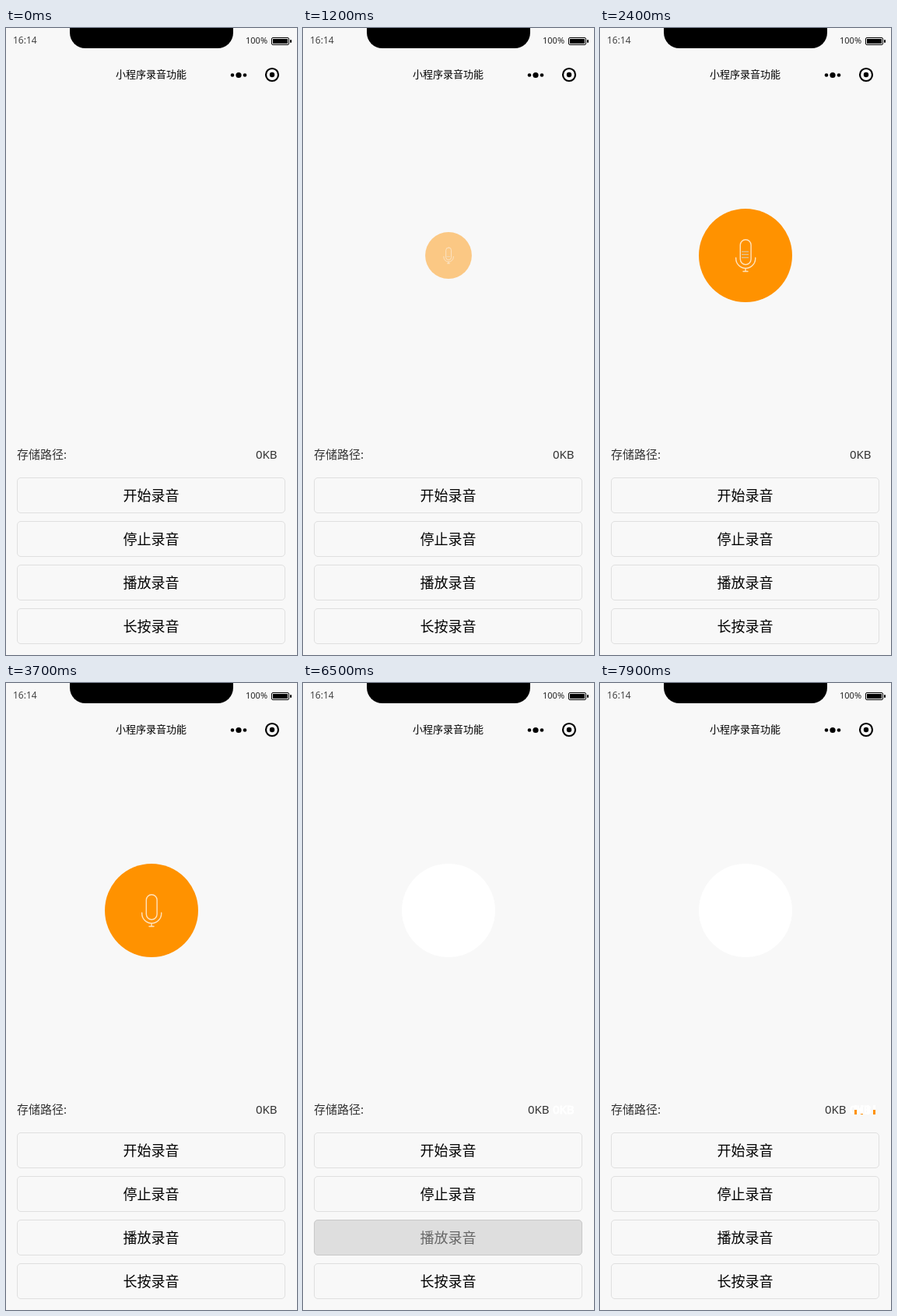
An HTML page that plays this animation: 374 by 805 pixels, repeating every 8 s.

```html
<!DOCTYPE html>
<html lang="zh-CN">
<head>
<meta charset="utf-8">
<style>
  html, body { margin: 0; height: 100%; overflow: hidden; background: #f8f8f8; }
  svg { display: block; width: 374px; height: 805px; font-family: "Noto Sans", "Noto Sans CJK SC", "Noto Sans CJK", sans-serif; }
  .line { fill: none; stroke: #ffe3bd; stroke-width: 1.4; stroke-linecap: round; }
  .key rect { fill: #f8f8f8; stroke: #dfdfdf; }
  .key text { font-size: 18px; text-anchor: middle; }
  .key.pressed rect { fill: #dedede; stroke: #c8c8c8; }
  .key.pressed text { fill: #666; }
</style>
</head>
<body>
<svg viewBox="0 0 374 805">
  <text x="9" y="20" font-size="12" fill="#444">16:14</text>
  <path d="M82 0V6a20 20 0 0 0 20 20H272a20 20 0 0 0 20-20V0Z"/>
  <text x="308" y="20" font-size="11" fill="#222">100%</text>
  <rect x="341.5" y="12.5" width="22" height="9" rx="1.5" fill="none" stroke="#000"/>
  <rect x="343" y="14" width="19" height="6"/>
  <rect x="365" y="15" width="2" height="4" rx="1"/>
  <text x="186.5" y="64" font-size="13" text-anchor="middle">小程序录音功能</text>
  <circle cx="291" cy="60.5" r="2.3"/><circle cx="299" cy="60.5" r="3.6"/><circle cx="307" cy="60.5" r="2.3"/>
  <circle cx="342" cy="60" r="8" fill="none" stroke="#000" stroke-width="2.2"/><circle cx="342" cy="60" r="3.2"/>

  <circle id="ghost" cx="187" cy="292" r="60" fill="#fff"/>
  <g id="recorder">
    <circle r="60" fill="#ff9200"/>
    <rect class="line" x="-6.7" y="-20.3" width="13.8" height="32" rx="6.9"/>
    <path class="line" d="M-12.3 3V4a12.5 12.5 0 0 0 25 0V3M0 16.5V20.5M-3 20.5H3"/>
    <g id="levels" fill="#e2c08e"></g>
  </g>

  <text x="14" y="553" font-size="15" fill="#333">存储路径:</text>
  <text id="ghostSize" x="321" y="553" font-size="15" fill="#fff" stroke="#fff">0KB</text>
  <text id="size" y="553" font-size="15" fill="#333">0KB</text>
  <g id="bars"></g>
  <g id="keys"></g>
</svg>
<script>
const $ = id => document.getElementById(id);

function add(parent, tag, attrs, text = '') {
  const el = document.createElementNS('http://www.w3.org/2000/svg', tag);
  for (const name in attrs) el.setAttribute(name, attrs[name]);
  el.textContent = text;
  return parent.appendChild(el);
}

const keys = ['开始录音', '停止录音', '播放录音', '长按录音'].map((label, i) => {
  const key = add($('keys'), 'g', { class: 'key' });
  const y = 577 + i * 56;
  add(key, 'rect', { x: 14.5, y: y + .5, width: 344, height: 45, rx: 4.5 });
  add(key, 'text', { x: 186.5, y: y + 30 }, label);
  return key;
});

const levels = [2, -2, -5.5, -8.5].map(y =>
  add($('levels'), 'rect', { x: -5, y, width: 9, height: 1.4 }));

const bars = [0, 1, 2, 3].map(i => {
  const bar = fill => add($('bars'), 'rect', { x: 327 + i * 8, width: 3, fill });
  return { trail: bar('#fff'), fill: bar('#ff9200') };
});

const show = (el, on) => el.setAttribute('visibility', on ? 'inherit' : 'hidden');

function setHeight(bar, h) {
  bar.setAttribute('y', 554 - h);
  bar.setAttribute('height', h);
}

function barHeight(i, t) {
  const degrees = (t - 7900) * .3 - 94 + i * 60;
  return Math.floor(12.95 * (1 - Math.cos(degrees * Math.PI / 180)) / 2);
}

function draw(t) {
  const recording = t >= 1100 && t < 4500;
  const playing = t >= 6500;
  keys[0].classList.toggle('pressed', t >= 1100 && t < 1200);
  keys[2].classList.toggle('pressed', t >= 6500 && t < 6600);

  // Zoom and fade in with an ease-out.
  const p = Math.min(1, Math.max(0, (t - 1100) / 400));
  const grow = 1 - (1 - p) ** 2.4;
  show($('recorder'), recording);
  $('recorder').setAttribute('transform', `translate(187 292) scale(${grow})`);
  $('recorder').setAttribute('opacity', grow * .86 + p * .14);
  show($('ghost'), t >= 4500);

  // Five-step level meter; its last step is empty.
  const step = Math.floor((t - 1100 + 20) % 900 / 180);
  levels.forEach((level, i) => show(level, step < 4 && i <= step));

  $('size').setAttribute('x', playing ? 289 : 321);
  show($('ghostSize'), playing);
  bars.forEach(({ trail, fill }, i) => {
    let peak = 0;
    for (let s = 6600; s <= t; s += 100) peak = Math.max(peak, barHeight(i, s));
    setHeight(trail, peak);
    setHeight(fill, t >= 6600 ? barHeight(i, t) : 0);
  });
}

const start = performance.now();
function tick() {
  const t = (performance.now() - start) % 8000;
  draw(Math.floor(t / 100) * 100);
  requestAnimationFrame(tick);
}
tick();
</script>
</body>
</html>
```
